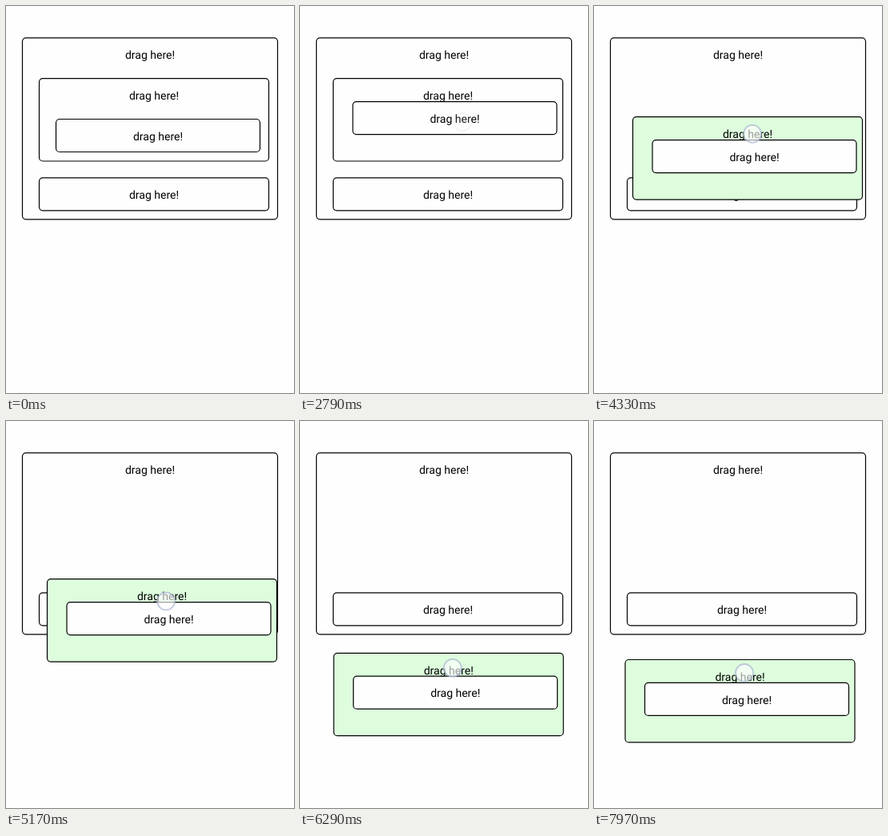
An HTML page with a canvas for the animation above (8 s loop, 360 by 484 pixels).

```html
<!DOCTYPE html>
<html lang="en">
<head>
<meta charset="utf-8">
<title>Nested draggable boxes</title>
<style>
  html, body { margin: 0; width: 100%; height: 100%; overflow: hidden; background: #fefefe; }
  canvas { display: block; width: 360px; height: 484px; }
</style>
</head>
<body>
<canvas></canvas>
<script>
const LOOP = 8000;
const LAG = 100; // a dragged box trails the finger by this many ms
const INNER_DRAG = { start: 790, end: 2540 };
const MIDDLE_DRAG = { start: 3150, end: Infinity };

// Key points of the second drag: [ms, x, y]
const middleKeys = [
  [3210, 41.5, 90.6], [4330, 48.5, 138.6], [4890, 50.8, 169.8], [5170, 51.5, 197.6],
  [5730, 47.5, 258.8], [6290, 42.2, 290.3], [7390, 39, 298.5]
];

const canvas = document.querySelector('canvas');
const ctx = canvas.getContext('2d');
const scale = window.devicePixelRatio || 1;
canvas.width = 360 * scale;
canvas.height = 484 * scale;

const ramp = (t, from, to) => Math.min(1, Math.max(0, (t - from) / (to - from)));
const isActive = (drag, t) => t >= drag.start && t < drag.end;

// Smooth curve through key points, resting before the first and after the last
function follow(keys, t) {
  const last = keys.length - 1;
  const time = Math.min(Math.max(t, keys[0][0]), keys[last][0]);
  const i = Math.max(1, keys.findIndex(key => key[0] >= time)) - 1;
  const [a, b] = [keys[i], keys[i + 1]];
  const span = b[0] - a[0];
  const u = (time - a[0]) / span;
  const slope = (k, axis) => {
    const before = keys[Math.max(k - 1, 0)];
    const after = keys[Math.min(k + 1, last)];
    return (after[axis] - before[axis]) / (after[0] - before[0]);
  };
  return [1, 2].map(axis =>
    a[axis] + (b[axis] - a[axis]) * u * u * (3 - 2 * u) +
    span * u * (1 - u) * ((1 - u) * slope(i, axis) - u * slope(i + 1, axis)));
}

// The first drag settles exponentially, faster sideways than upwards
function innerShift(t) {
  const elapsed = Math.max(0, t - INNER_DRAG.start);
  const settle = tau => 1 - Math.exp(-elapsed / tau);
  return [3.5 * settle(130), -22 * settle(350)];
}

function drawBox(x, y, width, height, active) {
  ctx.beginPath();
  ctx.roundRect(x, y, width, height, 4.5);
  ctx.fillStyle = active ? '#ddfddd' : '#fefefe';
  ctx.fill();
  ctx.strokeStyle = '#000';
  ctx.lineWidth = 1.2;
  ctx.stroke();
  ctx.fillStyle = '#000';
  ctx.fillText('drag here!', x + width / 2, y + 26.2);
}

function drawFinger(x, y, alpha) {
  ctx.globalAlpha = alpha;
  ctx.beginPath();
  ctx.arc(x, y, 11, 0, 2 * Math.PI);
  ctx.fillStyle = 'rgba(255, 255, 255, 0.62)';
  ctx.fill();
  ctx.strokeStyle = 'rgba(165, 173, 206, 0.65)';
  ctx.lineWidth = 1.8;
  ctx.stroke();
  ctx.globalAlpha = 1;
}

function render(t) {
  ctx.setTransform(scale, 0, 0, scale, 0, 0);
  ctx.fillStyle = '#fefefe';
  ctx.fillRect(0, 0, 360, 484);
  ctx.font = '14px Roboto, sans-serif';
  ctx.textAlign = 'center';
  ctx.textRendering = 'geometricPrecision';

  const [middleX, middleY] = follow(middleKeys, t);
  const [shiftX, shiftY] = innerShift(t);
  drawBox(20.5, 39.8, 319, 227, false);
  drawBox(41.5, 214.8, 287, 41, false);
  drawBox(middleX, middleY, 287, 103.4, isActive(MIDDLE_DRAG, t));
  drawBox(middleX + 21 + shiftX, middleY + 50.9 + shiftY, 255, 41, isActive(INNER_DRAG, t));

  const [dragX, dragY] = innerShift(t + LAG * ramp(t, 790, 900));
  drawFinger(199.5 + dragX, 167 + dragY, ramp(t, 260, 440) * ramp(t, 2860, 2500));
  const [fingerX, fingerY] = follow(middleKeys, t + LAG);
  drawFinger(fingerX + 149, fingerY + 16.5, ramp(t, 2900, 3060));
}

function tick() {
  render(performance.now() % LOOP);
  requestAnimationFrame(tick);
}
tick();
</script>
</body>
</html>
```
